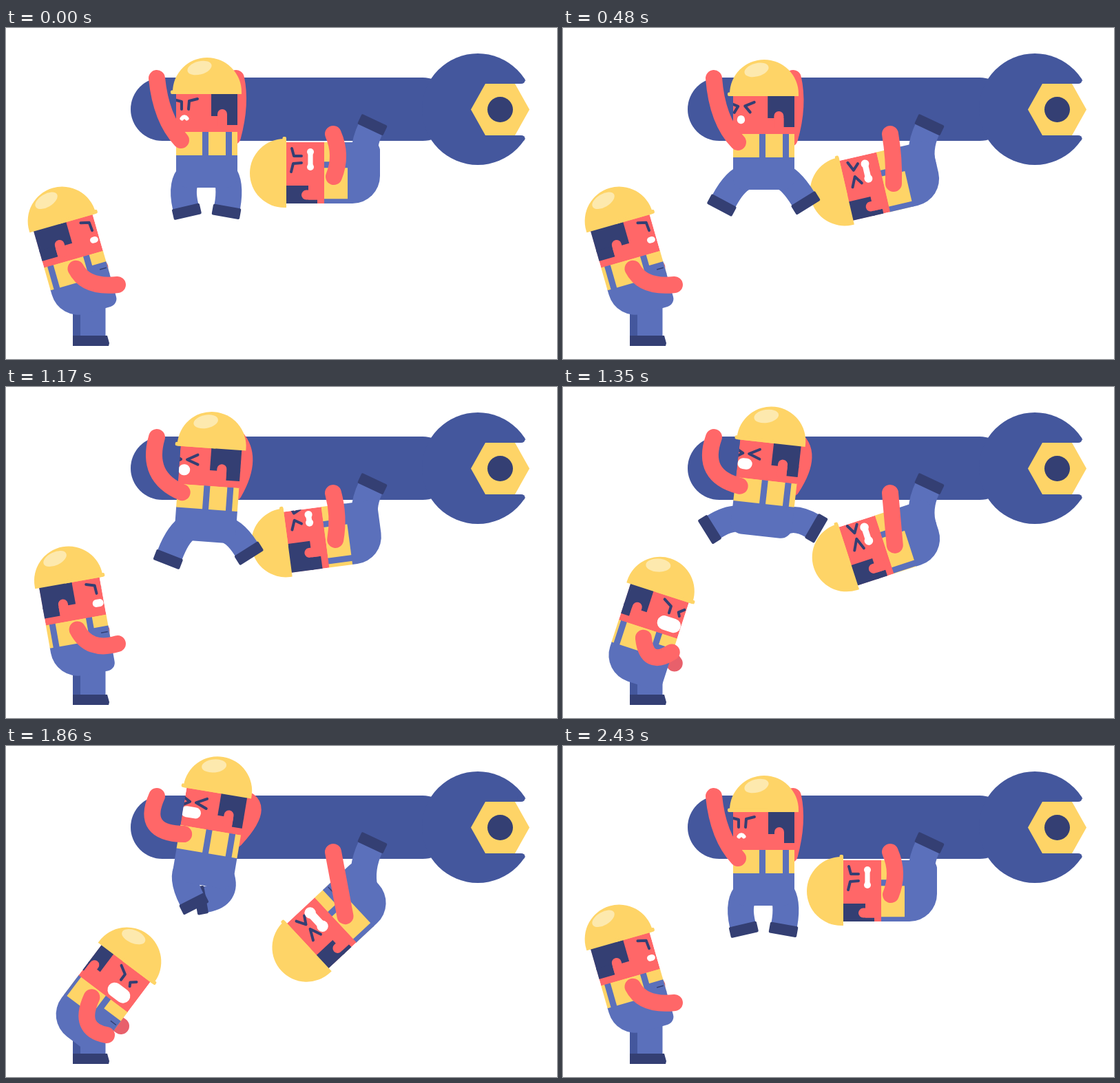
Recreate the animation shown at these times as an HTML page with a canvas. Size 800 px wide and 481 px high, loop 2.7 s.

```html
<!DOCTYPE html>
<html lang="en">
<head>
<meta charset="utf-8">
<title>Workers and wrench</title>
<style>
  html, body { margin: 0; width: 100%; height: 100%; overflow: hidden; background: #fff; }
  canvas { display: block; }
</style>
</head>
<body>
<canvas id="stage" width="800" height="481"></canvas>
<script>
const ctx = document.getElementById('stage').getContext('2d');
const LOOP = 2700, ACTIVE = 2430, STEP = 30;
const C = {
  steel: '#44579d', blue: '#5b70bb', dark: '#343f73', skin: '#ff6768',
  shade: '#e8606b', yellow: '#fed467', shine: '#fde9ae', white: '#fff'
};

// Key points: time, then the values that drive everything else.
const PULL_UP = [ // lift, left and right leg swing
  [0, 0, -13, -10], [270, .83, 60, 60], [480, -.1, 28, 32], [960, 0, -25, -2],
  [1350, .52, 58, 60], [1860, 1, -27, -80], [2160, .1, 82, 73], [ACTIVE, 0, -13, -10]
];
const TILT = [[0, 0], [270, 19], [480, 13], [960, 0], [1350, 18], [1860, 43], [2160, 29.5], [ACTIVE, 0]];
const REST = -16;
const LEAN = [[0, REST], [570, REST], [810, -34], [960, -22], [1080, -20], [1350, 18], [1860, 37], [2160, REST], [ACTIVE, REST]];

const EYES = {
  open: [[[-14, -82], [-26, -79], [-27, -67]], [[-48, -81], [-37, -78], [-37, -67]]],
  squint: [[[-13, -78], [-28, -70], [-12, -64]], [[-50, -77], [-37, -70], [-48, -63]]],
  frown: [[[-13, -83], [-25, -76], [-25, -66]], [[-45, -77], [-38, -71], [-41, -66]]]
};

const rad = deg => deg * Math.PI / 180;
const clamp = v => Math.max(0, Math.min(1, v));
const lerp = (a, b, k) => a + (b - a) * k;
const mix = (p, q, k) => p.map((v, i) => lerp(v, q[i], k));
const glance = t => Math.exp(-(((t - 960) / 300) ** 2));

// Monotone cubic through the key points: smooth, no overshoot.
function sample(keys, t) {
  let i = 0;
  while (i < keys.length - 2 && t >= keys[i + 1][0]) i++;
  const span = keys[i + 1][0] - keys[i][0], k = clamp((t - keys[i][0]) / span);
  return keys[0].slice(1).map((_, n) => {
    const c = n + 1;
    const slope = j => keys[j] && keys[j + 1]
      ? (keys[j + 1][c] - keys[j][c]) / (keys[j + 1][0] - keys[j][0]) : 0;
    const tangent = j => {
      const a = slope(j - 1), b = slope(j);
      return a * b > 0 ? 2 * a * b / (a + b) : 0;
    };
    return lerp(keys[i][c], keys[i + 1][c], k * k * (3 - 2 * k))
      + span * k * (1 - k) * (tangent(i) * (1 - k) - tangent(i + 1) * k);
  });
}

function rect(color, x, y, w, h, r = 0) {
  ctx.fillStyle = color;
  ctx.beginPath();
  ctx.roundRect(x, y, w, h, r);
  ctx.fill();
}

function disc(color, x, y, rx, ry = rx, rot = 0) {
  ctx.fillStyle = color;
  ctx.beginPath();
  ctx.ellipse(x, y, rx, ry, rot, 0, Math.PI * 2);
  ctx.fill();
}

function poly(color, points) {
  ctx.fillStyle = color;
  ctx.beginPath();
  points.forEach(p => ctx.lineTo(...p));
  ctx.fill();
}

function curve(color, width, from, ctrl, to, cap = 'round') {
  ctx.strokeStyle = color;
  ctx.lineWidth = width;
  ctx.lineCap = cap;
  ctx.beginPath();
  ctx.moveTo(...from);
  ctx.quadraticCurveTo(...ctrl, ...to);
  ctx.stroke();
}

const arm = (from, elbow, to, color = C.skin) => curve(color, 24, from, elbow, to);

function leg(hip, x, y, angle) {
  const a = rad(angle);
  curve(C.blue, 38, hip, [x - Math.sin(-a) * -1 * -34, y - Math.cos(a) * 34], [x, y], 'butt');
  ctx.save();
  ctx.translate(x, y);
  ctx.rotate(a);
  rect(C.dark, -20.5, -1, 41, 16, 2);
  ctx.restore();
}

// Maps a point of a worker's own space to the stage.
function place(w, x, y) {
  const a = rad(w.rot), fx = w.flip ? -x : x;
  return [w.x + fx * Math.cos(a) - y * Math.sin(a), w.y + fx * Math.sin(a) + y * Math.cos(a)];
}

function eyes(w) {
  ctx.strokeStyle = C.dark;
  ctx.lineWidth = 4;
  ctx.lineCap = ctx.lineJoin = 'round';
  EYES.open.forEach((eye, e) => {
    ctx.beginPath();
    eye.forEach((p, i) => {
      const [x, y] = mix(p, EYES[w.look][e][i], w.strain);
      ctx.lineTo(x + w.turn, y);
    });
    ctx.stroke();
  });
}

function mouth({ x, y, w, h, bend = 0, pinch = 0 }) {
  const half = Math.max(.1, (w - h) / 2);
  curve(C.white, h * (1 - pinch), [x - half, y + bend / 2], [x, y - bend], [x + half, y + bend / 2]);
  if (pinch) [-half, half].forEach(dx => disc(C.white, x + dx, y, h / 2));
}

function face(w) {
  ctx.save();
  ctx.beginPath();
  ctx.rect(-45, -93, 89, 59);
  ctx.clip();
  rect(C.skin, -45, -93, 89, 59);
  const ear = 22 + w.turn * .8;
  rect(C.dark, 6 + w.turn, -93, 60, 36);
  rect(C.dark, ear + 7, -60, 60, 16);
  rect(C.skin, ear - 7, -67, 14, 25, [7, 7, 0, 0]);
  eyes(w);
  mouth(w.mouth);
  ctx.restore();
}

function helmet(shineX) {
  ctx.fillStyle = C.yellow;
  ctx.beginPath();
  ctx.arc(0, -92, 50, Math.PI, 0);
  ctx.lineTo(50, -89);
  ctx.lineTo(-50, -89);
  ctx.fill();
  rect(C.yellow, -53, -94.5, 60, 5.5, 2);
  if (shineX) disc(C.shine, shineX, -127, 18, 9.5, rad(15 * Math.sign(shineX)));
}

// The clothes shift sideways as a worker turns.
const clothShift = w => Math.max(0, w.turn) * .6;

function torso(w) {
  ctx.save();
  ctx.translate(w.x, w.y);
  ctx.rotate(rad(w.rot));
  if (w.flip) ctx.scale(-1, 1);
  rect(C.blue, -45, -1, 89, 48, w.flip ? [0, 0, 40, 12] : [0, 0, 16, 16]);
  rect(C.yellow, -45, -35, 89, 35);
  for (const x of w.flip ? [-24, 30] : [-7, 27]) {
    const left = x + clothShift(w);
    rect(C.blue, left, -35, Math.min(9, 44 - left), 36);
  }
  if (w.flip) {
    rect(C.blue, -45, -18, 25 + clothShift(w), 19);
    rect(C.dark, -43, -10, 10, 1.5);
  }
  face(w);
  helmet(w.shine);
  ctx.restore();
}

function drawWrench() {
  rect(C.steel, 181, 72, 470, 92, 46);
  disc(C.steel, 685, 118, 81);
  rect(C.white, 718, 81, 60, 75);
  for (const [y, edge] of [[76.5, 81], [160.5, 156]]) {
    rect(C.white, 748, Math.min(y, edge), 10, Math.abs(edge - y));
    disc(C.steel, 748, y, 5.5, 4.5);
  }
  poly(C.yellow, [[675, 118.5], [696, 81], [739, 81], [760, 118.5], [739, 156], [696, 156]]);
  disc(C.dark, 717.5, 118.5, 18.5);
}

function drawSwinger(t) {
  const [tilt] = sample(TILT, t), g = glance(t), strain = clamp(tilt / 18);
  const w = {
    x: 496 + tilt * .18, y: 211 + tilt * .44, rot: -90 - tilt, flip: true,
    turn: 12 - 26 * g, look: 'squint', strain,
    mouth: { x: -20 - 17 * g, y: -54, w: 32 + tilt * .25 - 18 * g, h: 10 + tilt * .15, pinch: .28 }
  };
  leg(place(w, -5, 28), 529, 147, 205);
  torso(w);
  const hand = [475, 154], shoulder = place(w, 5, -20);
  const [mx, my] = mix(hand, shoulder, .5);
  arm(shoulder, [mx + 13 * (1 - strain), my], hand);
}

function drawHanger(t) {
  const [lift, left, right] = sample(PULL_UP, t);
  const up = Math.max(0, lift), strain = clamp(Math.abs(lift) * 5), turn = -10 * glance(t);
  const w = {
    x: 292, y: 185 - 29 * lift, rot: 9.5 * up ** .6, turn, look: 'squint', strain, shine: -11,
    mouth: { x: -33 + turn * .7, y: -55, w: 13 + 16 * lift, h: lerp(6, 16, strain), bend: 3 * (1 - strain) }
  };
  arm(place(w, 37, -27), [342 + 42 * up - turn * 1.2, w.y - 75], [334, 73]);
  for (const [side, swing] of [[1, right], [-1, left]]) {
    const s = Math.sin(rad(swing));
    leg(place(w, side * 25, 28), w.x - 2 + side * (38 + 39 * s),
      w.y + 75 - 8 * up - 52 * Math.max(0, s) ** 2, -side * swing);
  }
  torso(w);
  arm(place(w, -38, -22), [225 - 30 * up * (2 - up) + turn * 1.6, w.y - 53 + 24 * up], [219, 73]);
}

function drawStander(t) {
  const [lean] = sample(LEAN, t);
  const push = clamp((lean - REST) / 53), back = Math.max(0, REST - lean);
  const raise = clamp(back / 6), strain = clamp(push * 1.5);
  const w = {
    x: 107 + 13 * push ** 2 - back / 2, y: 369 + 18 * Math.sin(push * Math.PI / 2),
    rot: lean, flip: true, turn: -11 + 27 * push ** 1.5, look: 'frown', strain, shine: 14,
    mouth: { x: -37 + 19 * push ** 1.5, y: -53 + 4 * push, w: 12 + 24 * strain - 6 * raise, h: 9 + 12 * strain - 3 * raise }
  };
  rect(C.blue, 97, 404, 47.5, 44);
  rect(C.steel, 97, 414, 11, 34);
  poly(C.dark, [[97, 447], [147, 447], [150, 458], [149, 462], [97, 462]]);

  // Each joint moves from rest to raised, or from rest to pushing.
  const joint = (rest, raised, pushed, k) => mix(mix(rest, raised, raise), pushed, k);
  const far = joint([130, 368], [143, 331], [167, 407], strain * lerp(.7, 1, push));
  const near = joint([162, 373], [136, 299], [146, 420], push ** 3);
  const elbow = joint([116, 378], [118, 325], [103, 412], push);
  const bulge = 60 * push * (1 - push);
  const shoulder = place(w, -34, -12);
  arm(shoulder, mix(shoulder, far, .5), far, C.shade);
  torso(w);
  arm(place(w, clothShift(w), -20), [elbow[0] + bulge, elbow[1] + bulge * .6], near);
}

function draw(t) {
  ctx.fillStyle = C.white;
  ctx.fillRect(0, 0, 800, 481);
  drawWrench();
  drawSwinger(t);
  drawHanger(t);
  drawStander(t);
}

let start;
function tick(now) {
  start ??= now;
  draw(Math.min(ACTIVE, Math.floor((now - start) % LOOP / STEP) * STEP));
  requestAnimationFrame(tick);
}
requestAnimationFrame(tick);
</script>
</body>
</html>
```
